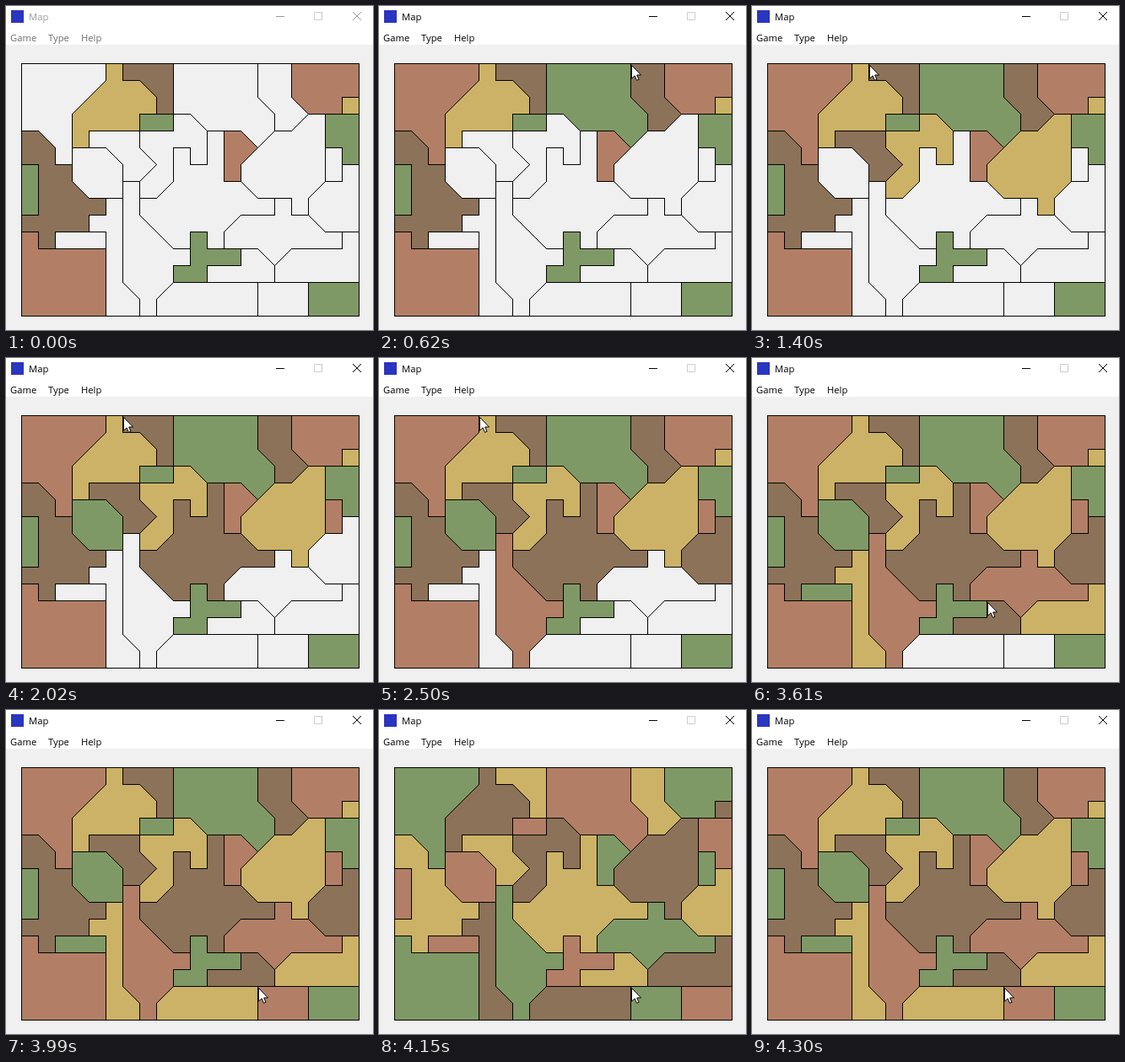
An HTML page with a canvas that plays this animation: 435x385 px, repeating every 4.7 s.

```html
<!DOCTYPE html>
<html lang="en">
<head>
<meta charset="utf-8">
<title>Map</title>
<style>
  html, body { margin: 0; width: 100%; height: 100%; overflow: hidden; background: #f0f0f0; }
  canvas { display: block; }
</style>
</head>
<body>
<canvas id="stage" width="435" height="385"></canvas>
<script>
const ctx = document.getElementById('stage').getContext('2d');
const LOOP = 4700, CELL = 20, LEFT = 18, TOP = 68, BLANK = '#f0f0f0';
const COLORS = ['#b27f66', '#ccb266', '#7f9966', '#8c7259'];
const RED = 0, YELLOW = 1, GREEN = 2, BROWN = 3;
const FLASH = [4070, 4150, 4220, 4300];

// Outline steps use the keys around S: w up, x down, a left, d right, q e z c diagonal
const STEP = {
  q: [-1, -1], w: [0, -1], e: [1, -1], a: [-1, 0],
  d: [1, 0], z: [-1, 1], x: [0, 1], c: [1, 1]
};

const regions = [];

// pick: when the pointer takes the colour; fill: when it drops it here
function region(x, y, color, outline, pick = 0, fill = 0) {
  const path = new Path2D(), walls = [];
  let px = LEFT + x * CELL, py = TOP + y * CELL;
  path.moveTo(px + 0.5, py + 0.5);
  for (const [, key, count] of outline.matchAll(/([a-z])(\d*)/g)) {
    const [dx, dy] = STEP[key], len = CELL * (count || 1);
    walls.push([px, py, dx, dy, len]);
    px += dx * len;
    py += dy * len;
    path.lineTo(px + 0.5, py + 0.5);
  }
  regions.push({ x, y, color, path, walls, pick, fill });
}

region(0, 0, RED, 'd5xz2x3awqaw4', 180, 250);
region(5, 0, YELLOW, 'dxdcxaxa3xaw2e2w');
region(6, 0, BROWN, 'd3x3awqaw');
region(9, 0, GREEN, 'd5x2cxzqa2qaw3', 320, 390);
region(14, 0, BROWN, 'd2x2czawqw2', 540, 620);
region(16, 0, RED, 'd4x2axa2qw2');
region(19, 2, YELLOW, 'dxaw');
region(7, 3, GREEN, 'd2xa2w');
region(9, 3, YELLOW, 'dcx2awax2zaweqwd2w', 700, 850);
region(17, 3, YELLOW, 'dx4zxawa2qwe2de', 930, 1080);
region(18, 3, GREEN, 'd2x3awaw2');
region(0, 4, BROWN, 'dcxdxcdxaxa2xawawdw3aw2');
region(4, 4, BROWN, 'd3xczawqaw', 1150, 1230);
region(11, 4, BROWN, 'dx3dcdxa2zxawaxaq2wdew2dxdw2', 1400, 1480);
region(12, 4, RED, 'dczxaw3');
region(3, 5, GREEN, 'd2cx2a2qw2', 1550, 1700);
region(18, 5, RED, 'dx2aw2', 1780, 1950);
region(0, 6, GREEN, 'dx3aw3');
region(19, 6, BROWN, 'dx4a2qwedw', 2020, 2190);
region(6, 7, RED, 'dx2c2dxaxzxawqw6', 2260, 2430);
region(5, 8, YELLOW, 'dx5cxa2w5awdw', 2500, 2670);
region(15, 8, RED, 'dxdcdxa3zqa2wed2w', 2740, 2910);
region(2, 10, GREEN, 'd3xa3w', 2980, 3150);
region(0, 10, RED, 'dxd4x4a5w5');
region(10, 10, GREEN, 'dxd2xa2xa2wdw2');
region(19, 10, YELLOW, 'dx3a5wed3w', 3230, 3380);
region(13, 11, BROWN, 'dcxa4wd2w', 3460, 3610);
region(9, 13, YELLOW, 'd5x2a6we', 3690, 3840);
region(14, 13, RED, 'd3x2a3w2', 3910, 3990);
region(17, 13, GREEN, 'd3x2a3w2');

// First given region of each colour is where the pointer picks it up
const sources = COLORS.map((_, i) => regions.find(r => !r.fill && r.color === i));

// Crisp one-pixel borders, drawn once
const walls = document.createElement('canvas');
walls.width = 435;
walls.height = 385;
const wallCtx = walls.getContext('2d');
for (const r of regions) {
  for (const [x, y, dx, dy, len] of r.walls) {
    for (let i = 0; i <= len; i++) wallCtx.fillRect(x + dx * i, y + dy * i, 1, 1);
  }
}

const arrow = new Path2D('M.5 .5V16.2L4.1 12.8L6.5 18.4L9 17.3L6.7 12H11.5Z');

function line(color, d) {
  ctx.strokeStyle = color;
  ctx.stroke(new Path2D(d));
}

function drawWindow(active) {
  ctx.fillStyle = BLANK;
  ctx.fillRect(0, 0, 435, 385);
  ctx.fillStyle = '#fff';
  ctx.fillRect(0, 0, 435, 46);

  ctx.fillStyle = '#2a35c0';
  ctx.fillRect(6, 5, 15, 15);

  const ink = active ? '#000' : '#999';
  ctx.font = '11.25px "Open Sans", "Noto Sans", sans-serif';
  ctx.fillStyle = ink;
  ctx.fillText('Map', 27, 17);
  ctx.fillStyle = active ? '#000' : '#6d6d6d';
  ctx.fillText('Game', 5, 42);
  ctx.fillText('Type', 50, 42);
  ctx.fillText('Help', 89, 42);

  ctx.lineWidth = 1;
  line(ink, 'M320 12.5h10');
  line('#ccc', 'M365.5 7.5h9v9h-9z');
  line(ink, 'M411 7l10 10M421 7l-10 10');
}

function drawMap(t) {
  const flash = t < FLASH[3] ? FLASH.filter(at => t >= at).length : 0;
  for (const r of regions) {
    ctx.fillStyle = t < r.fill ? BLANK : COLORS[(r.color + flash) % 4];
    ctx.fill(r.path);
  }
  ctx.drawImage(walls, 0, 0);
}

function drawPointer(t) {
  const r = regions.filter(r => r.fill && t >= r.pick).pop();
  if (!r) return;
  const at = t < r.fill ? sources[r.color] : r;
  ctx.save();
  ctx.translate(LEFT + at.x * CELL + 1, TOP + at.y * CELL + 2);
  ctx.fillStyle = '#fff';
  ctx.fill(arrow);
  line('#000', arrow);
  ctx.restore();
}

const start = performance.now();

function tick() {
  const t = (performance.now() - start) % LOOP;
  drawWindow(t >= 100);
  drawMap(t);
  drawPointer(t);
  requestAnimationFrame(tick);
}
tick();
</script>
</body>
</html>
```
